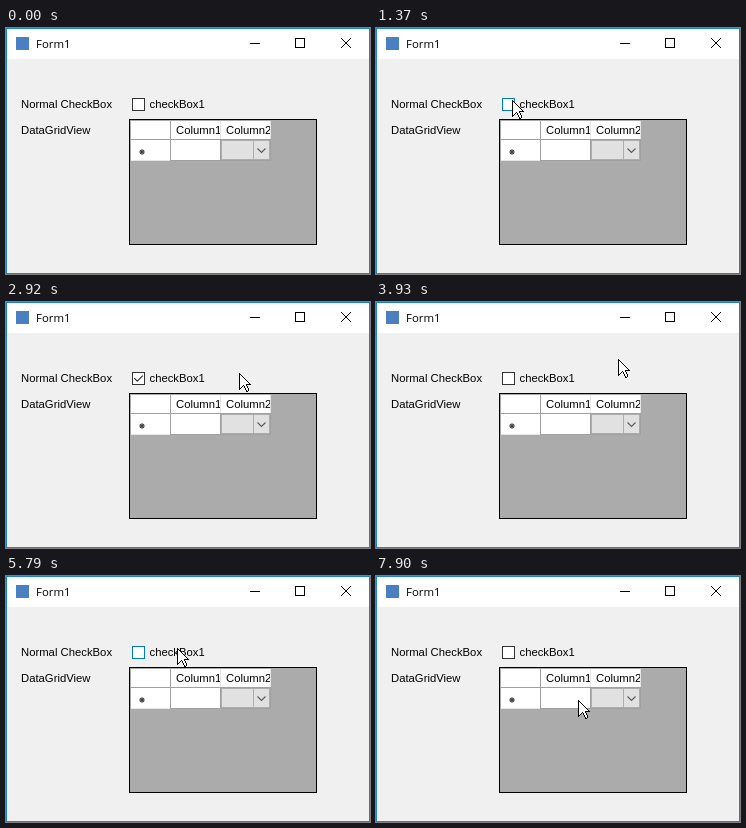
An HTML page with a canvas that plays this animation: 364 px wide and 246 px high, repeating every 7990 ms.

```html
<!DOCTYPE html>
<html lang="en">
<head>
<meta charset="utf-8">
<title>Form1</title>
<style>
  html, body { margin: 0; width: 364px; height: 246px; overflow: hidden; }
  canvas { display: block; }
</style>
</head>
<body>
<canvas id="stage" width="364" height="246"></canvas>
<script>
const ctx = document.getElementById('stage').getContext('2d');
const LOOP = 7990;
const STEP = 77; // pointer refresh interval in ms
const UI = '11.3px "Liberation Sans", Arial, sans-serif';
const GREY = '#a0a0a0';
const PALE = '#e5e5e5';

// Each glide leads in a straight line from the previous stop to (x, y).
const ENTRY = { x: 168, y: 10 };
const GLIDES = [
  { from: 600, to: 1370, x: 136, y: 72 },
  { from: 1370, to: 1460, x: 131, y: 78 },
  { from: 2543, to: 2920, x: 233, y: 71 },
  { from: 2920, to: 3470, x: 242, y: 57 },
  { from: 4473, to: 4780, x: 205, y: 60 },
  { from: 4780, to: 5330, x: 176, y: 67 },
  { from: 5330, to: 5480, x: 171, y: 72 },
  { from: 6038, to: 6510, x: 259, y: 57 },
  { from: 7593, to: 7900, x: 202, y: 124 }
];
const CLICKS = [{ down: 2230, up: 2380, cleared: 3930 }, { down: 5960, up: 6038, cleared: 7140 }];

function pointerAt(t) {
  if (t < GLIDES[0].from) return null;
  const i = GLIDES.findLastIndex(g => t >= g.from);
  const glide = GLIDES[i], start = GLIDES[i - 1] || ENTRY;
  const steps = Math.round((glide.to - glide.from) / STEP);
  const passed = Math.floor(steps * (t - glide.from) / (glide.to - glide.from) + 0.1);
  const f = Math.min(1, passed / steps);
  const mix = (a, b) => Math.round(a + (b - a) * f);
  return { x: mix(start.x, glide.x), y: mix(start.y, glide.y) };
}

function rect(x, y, w, h, color) {
  ctx.fillStyle = color;
  ctx.fillRect(x, y, w, h);
}

function box(x, y, w, h, border, fill) {
  rect(x, y, w, h, border);
  rect(x + 1, y + 1, w - 2, h - 2, fill);
}

function line(points, color, width = 1) {
  ctx.beginPath();
  points.forEach(([x, y]) => ctx.lineTo(x, y));
  ctx.strokeStyle = color;
  ctx.lineWidth = width;
  ctx.stroke();
}

function ring(x, y, radius, color) {
  ctx.beginPath();
  ctx.arc(x, y, radius, 0, 2 * Math.PI);
  ctx.strokeStyle = color;
  ctx.lineWidth = 1;
  ctx.stroke();
}

// A line of whole pixels, without smoothing.
function pixelLine([x0, y0], [x1, y1], color) {
  const n = Math.max(Math.abs(x1 - x0), Math.abs(y1 - y0));
  for (let i = 0; i <= n; i++) {
    rect(Math.round(x0 + (x1 - x0) * i / n), Math.round(y0 + (y1 - y0) * i / n), 1, 1, color);
  }
}

function text(str, x, y, font = UI) {
  ctx.font = font;
  ctx.fillStyle = '#000';
  ctx.fillText(str, x, y);
}

function clippedText(str, x, y, right) {
  ctx.save();
  ctx.beginPath();
  ctx.rect(x, y - 12, right - x, 16);
  ctx.clip();
  text(str, x, y);
  ctx.restore();
}

function drawWindow() {
  box(0, 0, 364, 246, '#1883d7', '#f0f0f0');
  rect(1, 1, 362, 30, '#fff');
  rect(10, 9, 13, 13, '#4a7fc1');
  text('Form1', 30, 20, '11.4px "Open Sans", "Noto Sans", sans-serif');
  rect(244, 15, 10, 1, '#000');
  box(289, 10, 10, 10, '#000', '#fff');
  line([[335, 10], [345, 20]], '#000');
  line([[345, 10], [335, 20]], '#000');
  text('Normal CheckBox', 15, 80);
  text('DataGridView', 15, 106);
  text('checkBox1', 143.5, 80);
}

function drawGrid() {
  box(123, 91, 188, 126, '#000', '#ababab');
  rect(125, 93, 140, 40, '#fff');
  for (const x of [214, 264]) {
    rect(x, 93, 1, 18, PALE);
    rect(x, 111, 1, 22, GREY);
  }
  rect(164, 93, 1, 40, GREY);
  rect(125, 111, 140, 1, GREY);
  rect(125, 132, 39, 1, PALE);
  rect(165, 132, 100, 1, GREY);
  clippedText('Column1', 170, 106, 214);
  clippedText('Column2', 220, 106, 264);

  for (let i = 0; i < 4; i++) {
    const a = i * Math.PI / 4, dx = 2.7 * Math.cos(a), dy = 2.7 * Math.sin(a);
    line([[136 - dx, 124 - dy], [136 + dx, 124 + dy]], '#404040', 1.3);
  }

  box(215, 112, 49, 20, '#adadad', '#e1e1e1');
  rect(247, 112, 1, 20, '#adadad');
  line([[251.5, 120.5], [255.5, 124.5], [259.5, 120.5]], '#5a5a5a', 1.1);
}

function drawCheckBox(checked, hot, pressed) {
  const border = pressed ? '#005499' : hot ? '#0078d7' : '#333';
  box(126, 70, 13, 13, border, pressed ? '#cce4f7' : '#fff');
  if (checked) line([[128.3, 76.2], [131.3, 79.2], [136.8, 73.7]], border, 1.2);
}

function drawPointer({ x, y }, pressed) {
  if (pressed) {
    ring(x + 0.5, y + 0.5, 10, '#000');
    ring(x + 0.5, y + 0.5, 9, '#fff');
  }
  const arrow = [[0, 0], [0, 16], [4, 12], [7, 18], [8, 18], [9, 16], [7, 12], [7, 11], [11, 11]]
    .map(([px, py]) => [x + px, y + py]);
  ctx.beginPath();
  arrow.forEach(([px, py]) => ctx.lineTo(px + 0.5, py + 0.5));
  ctx.fillStyle = '#fff';
  ctx.fill();
  arrow.forEach((p, i) => pixelLine(p, arrow[(i + 1) % arrow.length], '#000'));
}

function draw(t) {
  const p = pointerAt(t);
  const hot = p && p.x >= 123 && p.x < 205 && p.y >= 68 && p.y < 85;
  const pressed = CLICKS.some(c => t >= c.down && t < c.up);
  const checked = CLICKS.some(c => t >= c.up && t < c.cleared);
  drawWindow();
  drawGrid();
  drawCheckBox(checked, hot, pressed);
  if (p) drawPointer(p, pressed);
}

const began = performance.now();
function tick() {
  draw((performance.now() - began) % LOOP);
  requestAnimationFrame(tick);
}
tick();
</script>
</body>
</html>
```
